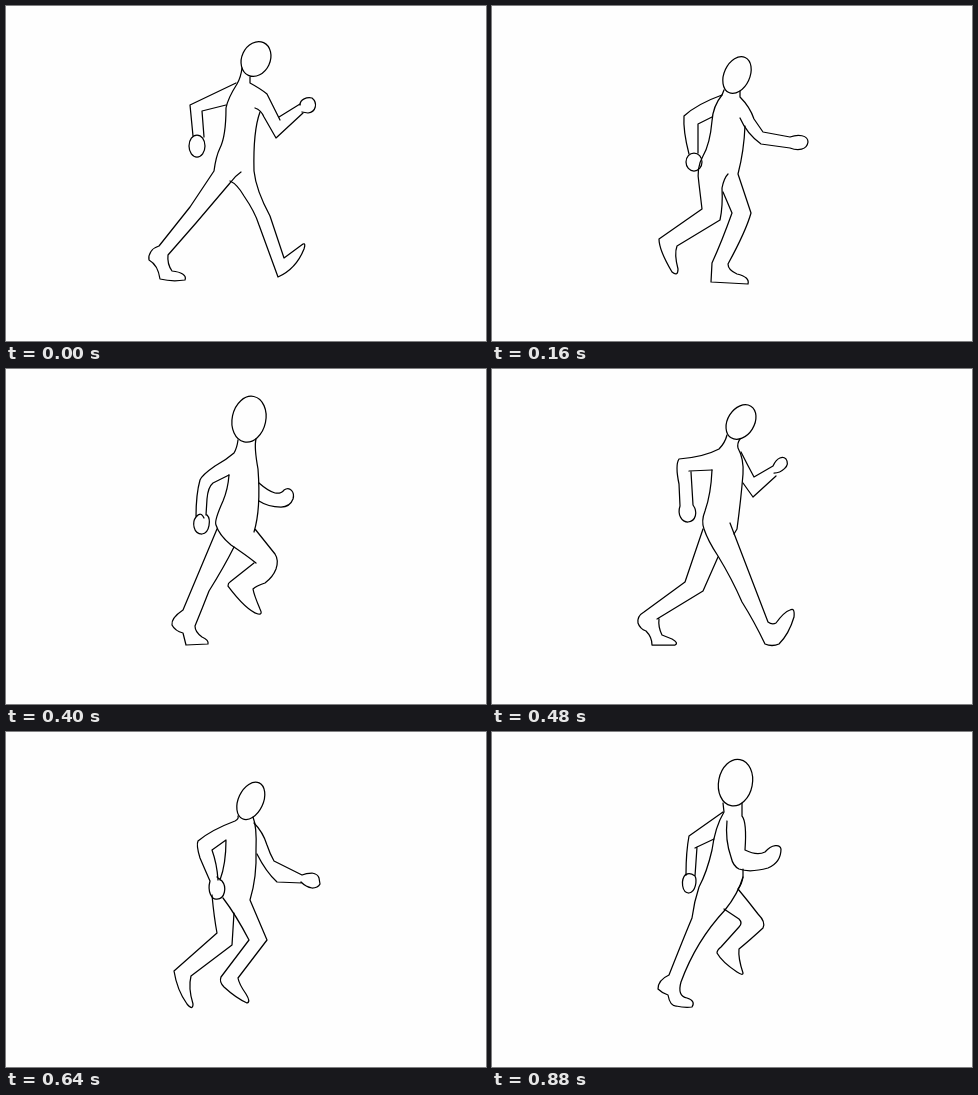
Write an HTML page that moves like this. It is 480 by 335 pixels and loops after 0.96 s.

```html
<!DOCTYPE html>
<html lang="en">
<head>
<meta charset="utf-8">
<title>Run cycle</title>
<style>
  html, body { margin: 0; width: 100%; height: 100%; overflow: hidden; background: #fefefe; }
  svg { display: block; width: 480px; height: 335px; }
  path, ellipse { fill: none; stroke: #000; stroke-width: 1.25; stroke-linecap: round; stroke-linejoin: round; }
  .pose {
    visibility: hidden;
    animation: show 960ms step-end infinite;
    animation-delay: calc((var(--i) - 12) * 80ms);
  }
  @keyframes show {
    0% { visibility: visible; }
    8.3333%, 100% { visibility: hidden; }
  }
</style>
</head>
<body>
<svg viewBox="0 0 480 335">
  <defs>
    <!-- head, torso and near arm shared by both passing poses -->
    <g id="passing">
      <ellipse rx="15" ry="20.1" transform="translate(247.8 58.8) rotate(30)"/>
      <path d="M232 75Q233 82 230 84Q207 97 194 117Q194 122 199 126L228 151"/>
      <path d="M250 76Q246 83 247 88Q253 100 252 130Q249 160 240 176"/>
      <path d="M236 98L207 120Q209 123 211 124L236 144C243 146 246 153 242 159C236 163 229 158 228 151L235 150"/>
      <path d="M221 110Q222 118 219 127M214 141Q206 150 207 162"/>
    </g>
  </defs>

  <!-- contact, near arm forward -->
  <g class="pose" style="--i:0">
    <ellipse rx="14.2" ry="18" transform="translate(250 53) rotate(25)"/>
    <path d="M236 62Q235 71 231 78Q222 92 220 102Q220 130 214 142Q210 150 208 165L184 201L153 240C146 242 142 248 143 254Q152 259 154 273Q166 276 179 274C181 269 175 266 166 265Q161 258 162 249L190 217L224 177Q229 170 235 166"/>
    <path d="M224 175Q231 178 238 190Q249 206 253 219L272 271Q290 263 298 243Q300 237 297 238L278 252L264 210Q250 184 248 165Q247 125 254 106"/>
    <path d="M244 71V77Q255 83 261 88L274 114M273 111L294 98M249 102Q255 104 258 111L270 132L297 107"/>
    <path d="M294 99C294 93 301 91 306 92C312 97 310 106 302 107L296 106"/>
    <path d="M230 77L184 99L187 130M220 99L196 105L198 131"/>
    <ellipse cx="191" cy="140" rx="8" ry="11"/>
  </g>

  <!-- down -->
  <g class="pose" style="--i:1">
    <ellipse rx="13.5" ry="18.2" transform="translate(242.5 80) rotate(18)"/>
    <path d="M231 95Q221 103 220 113Q218 135 211 149Q203 160 204 181L190 215L139 224Q138 232 145 250Q152 266 161 264Q157 250 159 234M157 234L201 229L218 190Q221 183 226 179L234 173"/>
    <path d="M231 95Q220 102 206 105Q190 107 189 111L184 149M220 116L194 122M201 121Q193 137 190 149"/>
    <ellipse cx="185.5" cy="156" rx="8" ry="8.5"/>
    <path d="M226 180Q240 193 252 208Q249 222 247 240Q244 258 245 271L281 274Q284 270 265 261Q259 257 258 252Q264 220 264 204Q252 187 248 176Q244 150 248 133L250 124"/>
    <path d="M241 98Q245 102 253 107L271 120L296 104C300 100 309 100 309 104Q306 114 297 118M246 125Q254 124 262 129L274 134L296 116"/>
  </g>

  <!-- recover -->
  <g class="pose" style="--i:2">
    <ellipse rx="12.8" ry="19.3" transform="translate(245 69) rotate(25)"/>
    <path d="M232 84L230 89Q221 100 220 115Q218 138 211 150Q204 162 207 178L210 203L167 233Q167 244 180 266Q186 271 186 263Q182 248 185 240L228 214Q231 200 230 182Q232 172 236 168"/>
    <path d="M230 89Q205 98 192 110Q191 125 197 148M220 111L206 118L206 147"/>
    <ellipse cx="202" cy="156" rx="8" ry="9"/>
    <path d="M231 186L240 207Q230 235 220 257L219 276L256 278Q258 271 245 268Q236 264 236 258Q254 225 259 207L246 168Q252 145 253 120"/>
    <path d="M248 85V91Q258 101 262 113L271 126L298 131C306 128 316 129 316 136C315 144 306 145 298 142L269 138Q255 128 248 112"/>
  </g>

  <!-- passing, near leg lifted -->
  <g class="pose" style="--i:3">
    <use href="#passing"/>
    <path d="M207 162Q211 174 222 187L241 208M238 204L215 213L182 225Q182 232 187 245Q190 262 194 261L196 243Q197 235 203 232L250 218Q255 216 255.500 210Q255 203 249 193Q238 172 228 157"/>
    <path d="M215 181L206 215M229 196Q223 203 222 208M192 258L190 272L231 273Q234 266 228 265Q214 264 211 258M219 228L208 260"/>
  </g>

  <!-- rising -->
  <g class="pose" style="--i:4">
    <ellipse rx="15.7" ry="21.3" transform="translate(245.5 55) rotate(18)"/>
    <path d="M232 75Q232 82 228 86Q205 98 194 113Q192 120 197 133L206 149C204 158 208 166 215 165C223 163 224 154 217 147M229 104L206 117Q208 130 217 147"/>
    <path d="M222 109Q221 125 216 140M207 160Q212 174 225 184L245 203L207 222Q206 226 212 236Q218 252 225 253Q228 252 225 240Q224 232 228 229L258 214Q265 208 262 199L246 167"/>
    <path d="M250 74Q247 82 249 92Q255 115 252 140Q250 155 245 168"/>
    <path d="M253 120Q260 130 266 127C272 124 277 131 274 138Q268 143 252 138"/>
    <path d="M212 175L184 246Q177 254 178 264L184 275L217 276Q219 271 210 269Q199 266 199 258L209 232M222 212L230 190"/>
  </g>

  <!-- up -->
  <g class="pose" style="--i:5">
    <ellipse rx="16.8" ry="23.2" transform="translate(243 50.2) rotate(12)"/>
    <path d="M232 71Q231 79 228 84Q220 91 209 97Q196 106 194 111Q190 125 190 148C186 153 187 165 196 165C204 164 205 150 201 146M190 148Q195 142 198 149M223 106L207 114Q202 118 201 130L200 146"/>
    <path d="M223 106Q222 120 217 132Q208 152 210 156Q213 166 225 176Q240 186 250 194"/>
    <path d="M250 70Q248 78 252 100Q255 140 248 163M249 160L269 185Q273 191 270 200Q267 208 259 214Q250 217 247 220Q248 226 254 240Q257 246 252 245Q240 241 222 217Q222 214 224 213L248 194"/>
    <path d="M253 114Q262 122 269 124Q275 125 278 121C284 117 289 123 287 130Q284 138 275 138Q262 138 253 132"/>
    <path d="M211 160L177 241Q165 249 166 256Q169 262 177 264L180 276L202 275Q203 271 196 268Q189 263 189 257Q196 240 203 222Q218 198 228 178"/>
  </g>

  <!-- contact, near arm back -->
  <g class="pose" style="--i:6">
    <ellipse rx="13.3" ry="18.6" transform="translate(249 53) rotate(32)"/>
    <path d="M235 66Q233 74 227 80Q212 88 187 90Q183 96 187 115L188 137C185 146 190 153 196 153C204 152 206 143 201 136L199 103M197 102L220 101"/>
    <path d="M220 101Q219 125 213 142Q209 152 212 160Q216 172 226 187Q240 210 250 233Q262 252 273 275Q280 278 287 275Q297 265 302 248Q303 238 298 241Q292 243 284 254Q280 256 276 253L238 154"/>
    <path d="M248 70Q245 74 246 79Q252 90 251 105Q249 130 245 160L242 165"/>
    <path d="M249 83Q255 95 262 108L281 97C285 88 291 87 294 90C299 97 289 104 282 104M284 107L261 128L251 114"/>
    <path d="M211 160L193 213L152 243Q145 247 146 254Q148 260 154 262Q160 268 160 276L183 276Q187 274 180 270L170 266Q166 258 167 250M165 250L211 222L226 188"/>
  </g>

  <!-- down -->
  <g class="pose" style="--i:7">
    <ellipse rx="13.5" ry="18.2" transform="translate(242.5 80) rotate(18)"/>
    <path d="M231 96Q226 101 208 104Q191 108 190 112Q186 130 186 147C179 152 181 166 190 166C199 165 200 152 194 148L202 121L220 115"/>
    <path d="M220 115Q218 136 211 149Q204 160 205 178Q211 184 226 190L252 212L247 250Q244 262 245 275L282 277Q284 271 266 264Q259 260 259 254Q266 222 265 205Q255 188 236 168"/>
    <path d="M204 181L190 215L139 224Q138 232 145 250Q152 266 161 264Q157 250 159 234L201 229L218 188M250 105V125Q245 150 247 178"/>
    <path d="M241 98Q246 103 253 108L271 124L296 115C303 110 311 113 310 118C308 126 302 128 297 127L274 138L250 125"/>
  </g>

  <!-- recover -->
  <g class="pose" style="--i:8">
    <ellipse rx="12.4" ry="19.8" transform="translate(244.800 68.800) rotate(25)"/>
    <path d="M232 84Q233 87 229 89Q205 98 192 109Q190 113 194 126Q200 140 204 149C201 160 206 168 211 167C219 167 221 155 216 149L211 145M220 108L206 118Q211 132 212 148M220 108Q220 132 214 148"/>
    <path d="M206 163Q208 185 211 201L168 239Q171 258 181 272Q187 279 187 272Q182 256 185 244L226 213L228 181"/>
    <path d="M217 166Q230 183 243 208L215 245Q213 250 218 255Q230 266 241 271Q245 270 240 262Q233 252 232 246L261 208L244 168Q251 145 250 118Q251 95 247 85"/>
    <path d="M248 91Q257 100 261 113Q264 122 268 129L296 143Q300 141 306 141Q312 142 313 146L314 152Q312 156 306 156Q300 155 295 150M251 122Q260 140 271 150L296 151"/>
  </g>

  <!-- passing, near leg planted -->
  <g class="pose" style="--i:9">
    <use href="#passing"/>
    <path d="M207 162Q212 185 207 214L192 256L190 273L231 274Q234 267 228 266Q214 265 211 259L228 216Q237 195 241 174"/>
    <path d="M240 176Q256 200 254 212Q246 217 228 220M206 216L183 225Q183 238 191 257"/>
  </g>

  <!-- rising -->
  <g class="pose" style="--i:10">
    <ellipse rx="15.7" ry="21.3" transform="translate(245.5 55) rotate(18)"/>
    <path d="M231 74Q232 80 229 86Q221 100 220 118Q215 140 208 154Q204 170 204 186L184 245Q176 252 177 262L183 274L215 275Q218 270 208 268Q198 266 198 258Q212 225 229 194Q242 175 250 148"/>
    <path d="M227 91Q208 101 201 110L199 140C194 147 197 157 204 156L208 153M220 112L210 117L209 142"/>
    <path d="M249 74Q247 82 249 88Q255 102 253 131M234 92Q227 112 231 124Q236 138 247 143C258 149 269 150 271 143C273 136 266 132 260 135L253 131"/>
    <path d="M247 158Q262 184 264 198Q264 207 258 211L231 224Q226 228 229 241Q231 253 226 252Q216 245 212 231M232 190L245 203L218 217"/>
  </g>

  <!-- up -->
  <g class="pose" style="--i:11">
    <ellipse rx="16.9" ry="23.5" transform="translate(243.5 50.6) rotate(11)"/>
    <path d="M231 71L232 80Q223 95 220 118Q215 140 207 155Q202 170 200 186Q192 205 177 243Q166 248 166 257Q170 261 176 263Q178 274 184 274Q193 276 200 275Q204 269 195 266Q185 264 189 250Q204 209 233 178Q246 162 251 145V137"/>
    <path d="M231 80L197 104Q194 120 194 142C188 148 190 161 197 161C204 160 205 148 203 144Q197 140 194 143M222 107L205 115L203 144M203 116L205 115"/>
    <path d="M250 71V84Q255 90 253 118Q265 124 273 120C280 112 288 112 289 117C289 128 283 133 276 136Q258 141 247 137Q241 134 239 125Q233 108 235 89"/>
    <path d="M251 145Q250 152 246 157Q256 169 266 182Q274 190 271 196Q258 208 247 217Q246 226 251 241Q251 244 245 240Q230 230 225 221Q225 218 229 215L247 195Q251 191 247 187L232 177"/>
  </g>
</svg>
</body>
</html>
```
